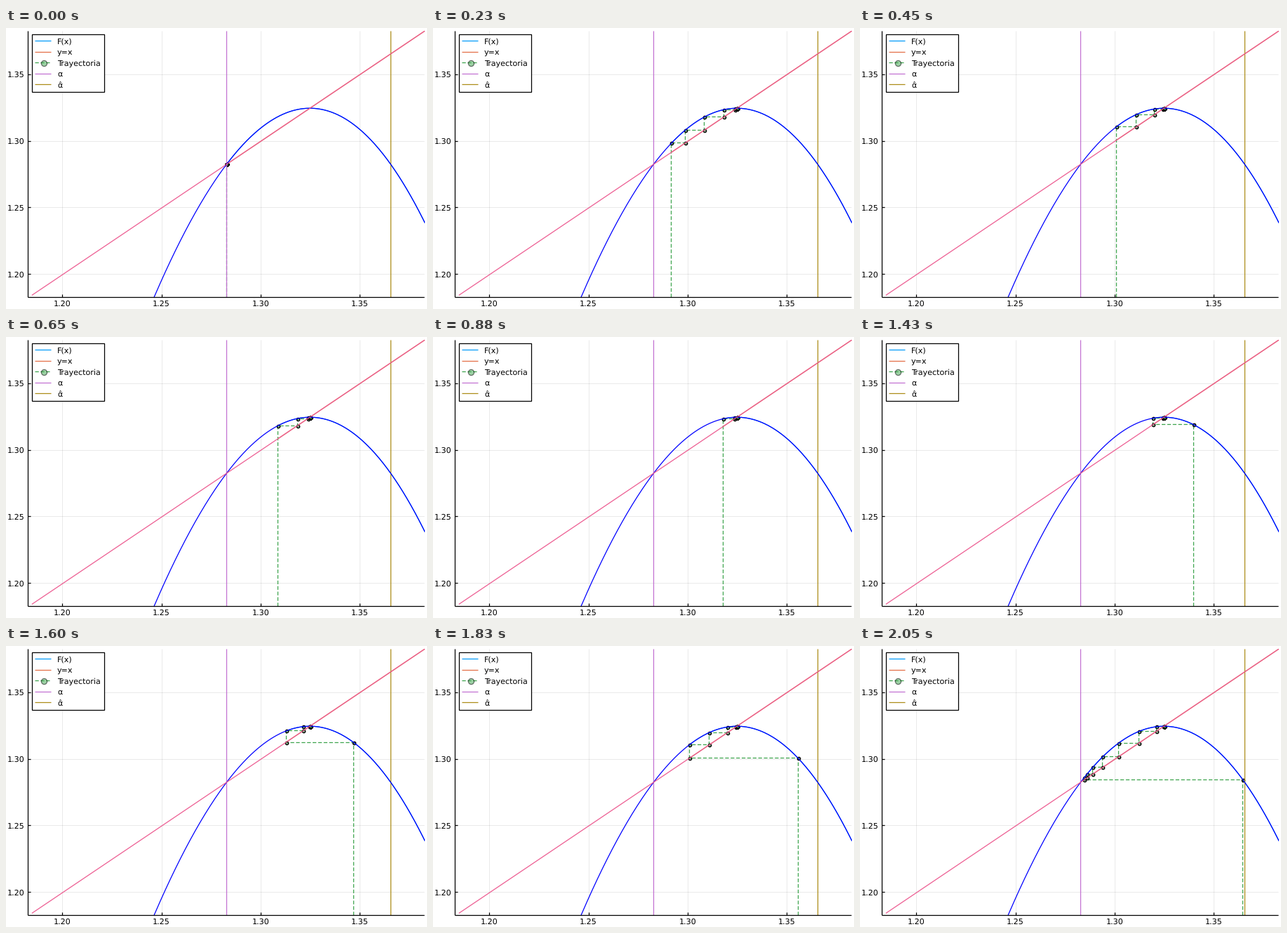
These frames come from a looping animation (600 px wide and 400 px high, 2.07 s). A matplotlib script:

```python
import numpy as np
import matplotlib.pyplot as plt
from matplotlib.animation import FuncAnimation
from matplotlib.patches import Rectangle

plt.rcParams.update({
    "font.family": "DejaVu Sans",
    "font.size": 8,
    "path.snap": False,
    "text.hinting": "none",
    "toolbar": "None",
})

W, H, DPI = 600, 400, 100
PX = 72 / DPI                                 # one pixel in points
LEFT, RIGHT, TOP, BOTTOM = 31.95, 596.8, 4.25, 383.75
LW = 1.25 * PX

AZURE, ORANGE, GREEN = "#009AFA", "#E36F47", "#3DA44D"
PURPLE, OCHRE, PINK = "#C271D2", "#AC8D18", "#ED5D92"
DASH = (0, (4.2, 2.1))

C = 1.7548776662466927                        # superstable period-3 parameter
STEP = 0.001                                  # start point shift per pose
POSE_MS, TICK_MS, LOOP_MS = 25, 10, 2070


def F(x):
    """Third iterate of x^2 - C."""
    for _ in range(3):
        x = x * x - C
    return x


def fixed_point(lo, hi):
    for _ in range(60):
        mid = (lo + hi) / 2
        if F(mid) < mid:
            lo = mid
        else:
            hi = mid
    return (lo + hi) / 2


ALPHA = fixed_point(1.27, 1.30)
ALPHA_HAT = np.sqrt(2 * C - ALPHA ** 2)
LO, HI = ALPHA - 0.1, ALPHA + 0.1


def cobweb(x, n=20):
    pts = [(x, LO)]
    for _ in range(n):
        y = F(x)
        pts += [(x, y), (y, y)]
        x = y
    return np.array(pts)


def to_px(x, y):
    sx, sy = (x - LO) / (HI - LO), (y - LO) / (HI - LO)
    return LEFT + sx * (RIGHT - LEFT), BOTTOM - sy * (BOTTOM - TOP)


def snap(v):
    """Centre of the pixel that holds v, for crisp straight lines."""
    return np.floor(v) + 0.5


fig = plt.figure(figsize=(W / DPI, H / DPI), dpi=DPI, facecolor="white")
stage = fig.add_axes([0, 0, 1, 1])
stage.set_xlim(0, W)
stage.set_ylim(H, 0)
stage.axis("off")
window = Rectangle((LEFT, TOP), RIGHT - LEFT, BOTTOM - TOP,
                   transform=stage.transData)


def curve(color, z, xs=(), ys=()):
    line, = stage.plot(xs, ys, color=color, lw=LW, zorder=z)
    line.set_clip_path(window)
    return line


def seg(x0, y0, x1, y1, color="black", lw=LW, **kw):
    stage.plot(snap(np.array([x0, x1])), snap(np.array([y0, y1])),
               color=color, lw=lw, solid_capstyle="butt", **kw)


def label(x, y, text, ha):
    stage.text(x, y, text, ha=ha, va="baseline", zorder=12)


# Grid, axes and tick labels
for v in (1.20, 1.25, 1.30, 1.35):
    x, y = to_px(v, v)
    seg(x, TOP, x, BOTTOM, lw=0.8 * PX, alpha=0.1, zorder=0)
    seg(LEFT, y, RIGHT, y, lw=0.8 * PX, alpha=0.1, zorder=0)
    seg(x, BOTTOM, x, BOTTOM - 4, zorder=9)
    seg(LEFT, y, LEFT + 4, y, zorder=9)
    label(x - 0.5, 396, f"{v:.2f}", "center")
    label(27, y + 3.65, f"{v:.2f}", "right")
seg(LEFT, TOP, LEFT, BOTTOM, zorder=9)
seg(LEFT, BOTTOM, RIGHT, BOTTOM, zorder=9)

# Curves
base_f = curve(AZURE, 1)
base_id = curve(ORANGE, 2)
path, = stage.plot([], [], color=GREEN, lw=LW, ls=DASH, zorder=3,
                   dash_capstyle="butt")
dots, = stage.plot([], [], "o", ms=4.2 * PX, mew=1.45 * PX, zorder=4,
                   mfc=(0.24, 0.64, 0.30, 0.5), mec="black")
for z, v, color in ((5, ALPHA, PURPLE), (6, ALPHA_HAT, OCHRE)):
    x, _ = to_px(v, v)
    seg(x, TOP, x, BOTTOM, color, zorder=z)
xs = np.linspace(LO, HI, 400)
curve("blue", 7, *to_px(xs, F(xs)))
ends = np.array([LO + 0.0019, HI])
curve(PINK, 8, *to_px(ends, ends))

# Legend
stage.add_patch(Rectangle((37.5, 9.5), 103, 82, fc="white", ec="black",
                          lw=LW, zorder=10))
entries = [("F(x)", AZURE), ("y=x", ORANGE), ("Trayectoria", GREEN),
           ("α", PURPLE), ("α̂", OCHRE)]
for k, (name, color) in enumerate(entries):
    y = 18.5 + 15.6 * k
    seg(41, y, 64, y, color, zorder=11, ls=DASH if color == GREEN else "-")
    if color == GREEN:
        stage.plot(53.5, snap(y), "o", ms=8.2 * PX, mew=1.3 * PX, zorder=12,
                   mfc=GREEN, mec="black", alpha=0.5)
    label(73, y + 3.9, name, "left")


def draw(tick):
    x0 = ALPHA + STEP * (tick * TICK_MS // POSE_MS)
    x, y = map(snap, to_px(*cobweb(x0).T))
    path.set_data(x, y)
    dots.set_data(x[1:], y[1:])
    sub = np.linspace(min(x0, F(x0)), HI, 300)
    base_f.set_data(*to_px(sub, F(sub)))
    base_id.set_data(*to_px(sub, sub))
    return path, dots, base_f, base_id


anim = FuncAnimation(fig, draw, frames=LOOP_MS // TICK_MS, interval=TICK_MS,
                     repeat=True, repeat_delay=0, blit=False)
plt.show()
```
